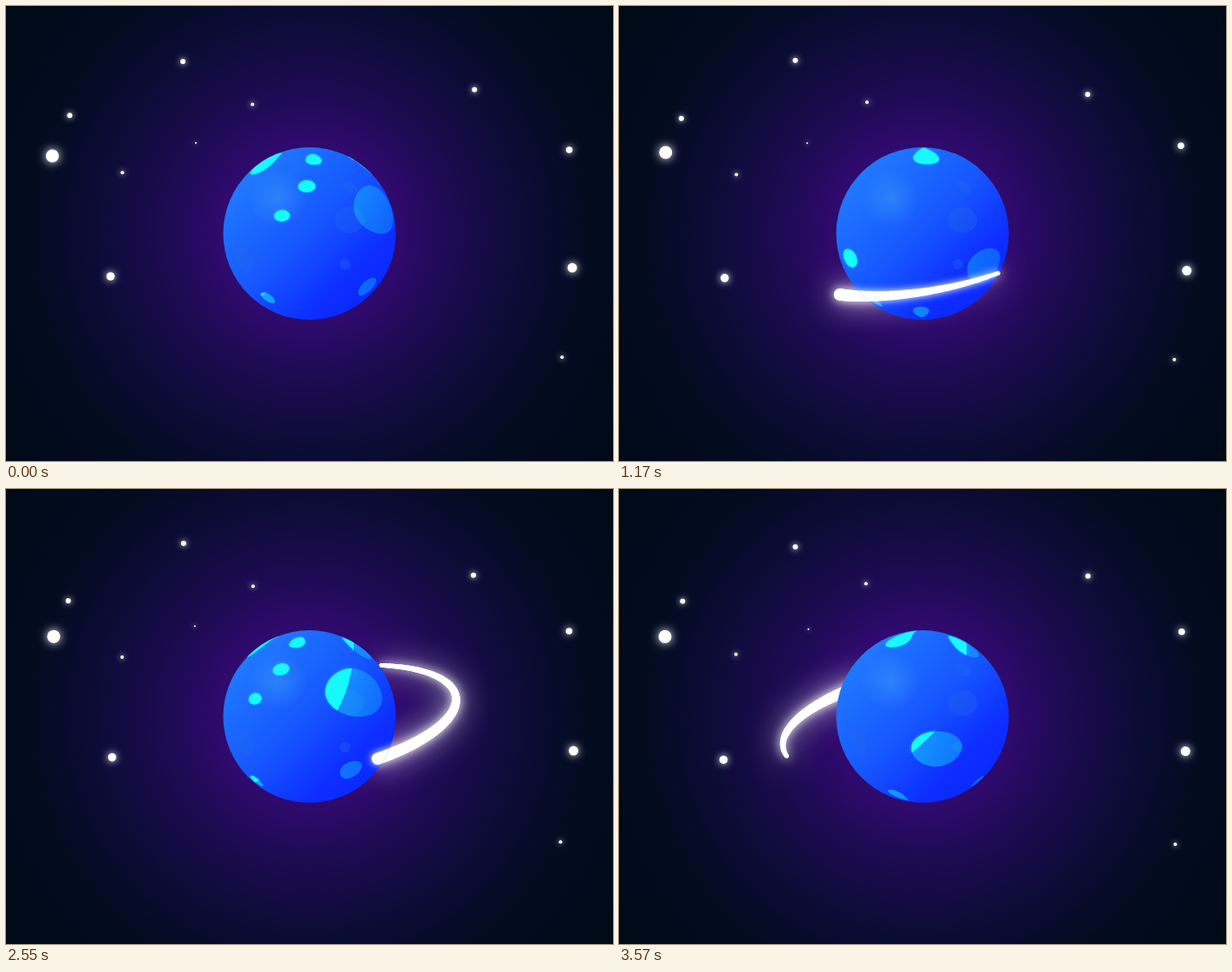
Recreate the animation shown at these times as an HTML page with a canvas. Size 700 by 525 pixels, loop 3.6 s.

```html
<!DOCTYPE html>
<html>
<head>
<meta charset="utf-8">
<style>
html, body { margin: 0; width: 100%; height: 100%; overflow: hidden; background: #010b17; }
canvas { display: block; }
</style>
</head>
<body>
<canvas id="stage" width="700" height="525"></canvas>
<script>
const ctx = document.getElementById('stage').getContext('2d');
const LOOP = 3600, STEP = 30, ORBIT = 1800, SPIN = 2700;
const TAU = Math.PI * 2, RAD = Math.PI / 180;
const CX = 350, CY = 262.5, R = 99.5;

// x, y, radius
const stars = [
  [204, 64, 3], [285, 111, 2], [72.5, 129, 3], [54, 171, 7.5], [134.5, 193, 2], [218, 159, 1],
  [121.5, 312, 4.8], [540, 99.5, 3], [649, 164, 3.8], [654, 302.5, 5.5], [640.5, 407.5, 2]
];

// starting longitude, height on stage, half width
const spots = [
  [-61.5, 182, 18], [-151, 173, 14], [86, 184, 18], [5, 177, 9], [-2, 208, 10],
  [-18, 242, 9.5], [53.6, 235, 41], [56, 324, 15], [-44, 337, 9], [-106, 300, 30],
  [145.5, 291, 15.5], [-158, 353, 9], [145, 342, 7]
];

// x, y, half width, half height, tilt
const craters = [
  [276, 292, 9, 16, -0.3], [396, 247, 17, 15, 0], [397, 209, 10, 6, 0.6], [391, 298, 6.5, 6, 0]
];

// time, orbit angle in degrees
const headKeys = [[0, -125], [690, 55], [1170, 128], [ORBIT, 250]];
const tailKeys = [[0, -125], [690, -80], [1110, 50], [1740, 153], [1950, 250]];

function keyed(keys, t) {
  const i = keys.findIndex(([time]) => time > t);
  if (i < 0) return keys[keys.length - 1][1];
  const [t0, v0] = keys[i - 1], [t1, v1] = keys[i];
  return v0 + (v1 - v0) * (t - t0) / (t1 - t0);
}

function withStops(gradient, stops) {
  stops.forEach(([at, color]) => gradient.addColorStop(at, color));
  return gradient;
}

const sky = withStops(ctx.createRadialGradient(CX, CY, 0, CX, CY, 430), [
  [0.2, '#330a74'], [0.27, '#2b0a68'], [0.35, '#210a58'], [0.48, '#150b44'],
  [0.6, '#0a0c33'], [0.75, '#030b20'], [1, '#010b17']]);
const ball = withStops(ctx.createLinearGradient(275, 195, 415, 335),
  [[0, '#2079ff'], [0.5, '#1656ff'], [0.85, '#0d2eff'], [1, '#0b2aff']]);
const shine = withStops(ctx.createRadialGradient(313, 222, 0, 313, 222, 34),
  [[0, 'rgba(52,140,245,.7)'], [1, 'rgba(52,140,245,0)']]);
const dimCyan = withStops(ctx.createLinearGradient(300, 0, 440, 0),
  [[0, 'rgba(23,248,255,.5)'], [1, 'rgba(23,248,255,.25)']]);
const litSide = new Path2D('M240 150H400Q409 241 355 289Q318 324 270 348H240Z');
const disc = new Path2D();
disc.arc(CX, CY, R, 0, TAU);

function glow(blur, color = '#fff') {
  ctx.shadowBlur = blur;
  ctx.shadowColor = color;
}

function drawStars(t) {
  ctx.fillStyle = '#fff';
  stars.forEach(([x, y, r], i) => {
    const drift = Math.sin(t / 250 + 2.4 * i) + Math.sin(t / 410 + i * i);
    glow(5 + r * 0.8);
    ctx.beginPath();
    ctx.arc(x + Math.sin(t / 300 + 4 * i), y + 1.6 * drift, r, 0, TAU);
    ctx.fill();
  });
  glow(0);
}

function drawMeteor(x, offset) {
  ctx.save();
  ctx.translate(x, offset - 0.704 * x);
  ctx.rotate(Math.atan(-0.704));
  ctx.fillStyle = withStops(ctx.createLinearGradient(0, 0, 88, 0),
    [[0, '#fff'], [0.4, 'rgba(255,255,255,.85)'], [1, 'rgba(255,255,255,0)']]);
  glow(7);
  ctx.beginPath();
  ctx.arc(0, 0, 5, Math.PI / 2, -Math.PI / 2);
  ctx.lineTo(88, -1);
  ctx.lineTo(88, 1);
  ctx.fill();
  ctx.restore();
}

// Union of discs along the orbit, growing towards the head
function cometPath(t, frontOnly) {
  const path = new Path2D();
  const head = keyed(headKeys, t), tail = keyed(tailKeys, t);
  const count = Math.ceil(head - tail);
  for (let i = 0; i < count; i++) {
    const u = i / count;
    const a = (tail + (head - tail) * u) * RAD;
    if (frontOnly && Math.sin(a) < 0) continue;
    const x = 354 + 165 * Math.cos(a);
    const y = 269 - 26 * Math.cos(a) + 60.5 * Math.sin(a);
    const r = 2.5 + 4.5 * u;
    path.moveTo(x + r, y);
    path.arc(x, y, r, 0, TAU);
  }
  return path;
}

function drawComets(t, frontOnly, ...blurs) {
  ctx.fillStyle = '#fff';
  for (const age of [t, t - ORBIT]) {
    if (age < 0) continue;
    const path = cometPath(age, frontOnly);
    for (const blur of blurs) {
      glow(blur);
      ctx.fill(path);
    }
  }
  glow(0);
}

function spotPath([lon, y0, w], t) {
  const path = new Path2D();
  const limit = Math.PI / 2;
  const half = w / Math.sqrt(R * R - (y0 - CY) ** 2);
  const turns = lon / 360 + t / SPIN;
  const center = 1.06 * TAU * (turns - Math.round(turns));
  if (Math.abs(center) - half > limit) return path;
  for (let a = 0; a < TAU; a += 0.1) {
    const y = y0 + 0.68 * w * Math.sin(a);
    const angle = Math.max(-limit, Math.min(limit, center + half * Math.cos(a)));
    path.lineTo(CX + Math.sqrt(Math.max(0, R * R - (y - CY) ** 2)) * Math.sin(angle), y);
  }
  path.closePath();
  return path;
}

function drawPlanet(t) {
  ctx.fillStyle = ball;
  ctx.fill(disc);
  ctx.save();
  ctx.clip(disc);
  ctx.fillStyle = shine;
  ctx.fillRect(270, 180, 90, 90);
  ctx.fillStyle = 'rgba(32,104,232,.35)';
  for (const [x, y, w, h, tilt] of craters) {
    ctx.beginPath();
    ctx.ellipse(x, y, w, h, tilt, 0, TAU);
    ctx.fill();
  }
  const paths = spots.map(spot => spotPath(spot, t));
  ctx.fillStyle = dimCyan;
  paths.forEach(path => ctx.fill(path));
  ctx.save();
  ctx.clip(litSide);
  ctx.fillStyle = '#17f8ff';
  glow(3, '#17c8ff');
  paths.forEach(path => ctx.fill(path));
  ctx.restore();
  drawComets(t, true, 8);
  ctx.restore();
}

function draw(now) {
  const t = Math.floor(now % LOOP / STEP) * STEP;
  ctx.fillStyle = sky;
  ctx.fillRect(0, 0, 700, 525);
  drawStars(t);
  drawMeteor(640 - 1.2 * t, 428);
  drawMeteor(833 - 1.1 * t, 509);
  drawComets(t, false, 34, 12);
  drawPlanet(t);
}

const begin = performance.now();
function tick() {
  draw(performance.now() - begin);
  requestAnimationFrame(tick);
}
tick();
</script>
</body>
</html>
```
